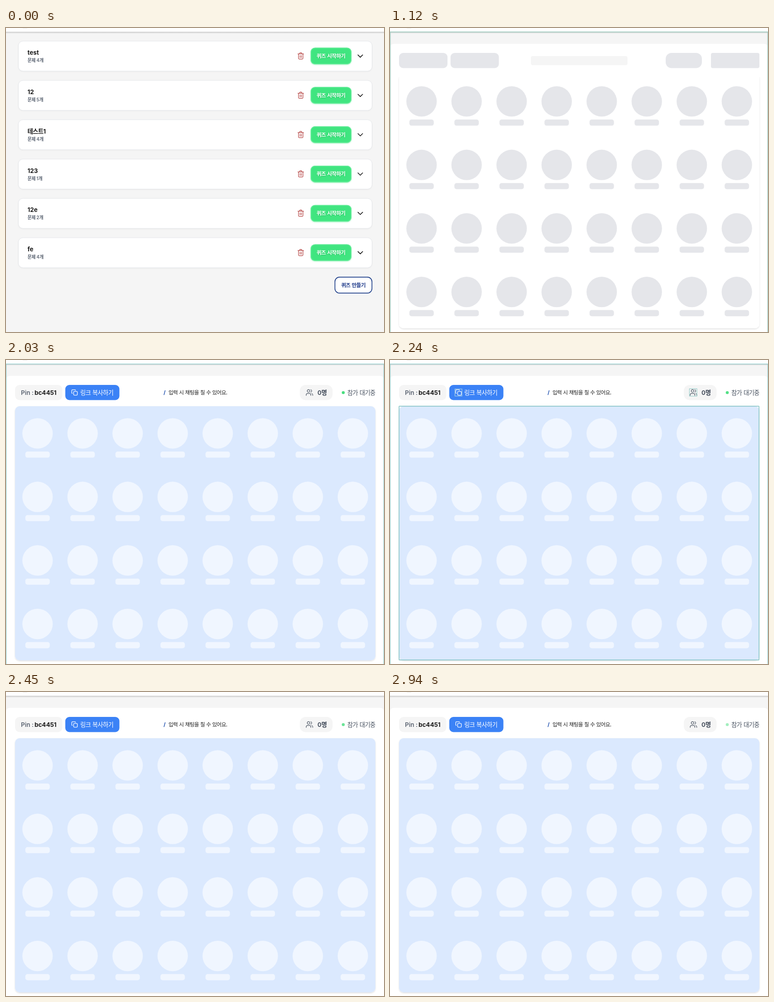
An HTML page for the animation above (3.01 s loop, 835x671 px).

```html
<!DOCTYPE html>
<html lang="ko">
<head>
<meta charset="utf-8">
<title>Quiz lobby</title>
<style>
  html, body { margin: 0; width: 100%; height: 100%; overflow: hidden; background: #f5f5f5; }
  svg { display: block; width: 100vw; height: 100vh; }
  text { font-family: Inter, "Noto Sans CJK KR", "Noto Sans CJK", sans-serif; white-space: pre; }
  .ko { letter-spacing: -.055em; }
  .line { fill: none; stroke-linecap: round; stroke-linejoin: round; }
</style>
</head>
<body>
<svg id="stage" viewBox="0 0 835 671" xmlns="http://www.w3.org/2000/svg"></svg>
<script>
const LOOP = 3010, STEP = 70;
const stage = document.getElementById('stage');

const rect = (x, y, w, h, r, fill, extra = '') =>
  `<rect x="${x}" y="${y}" width="${w}" height="${h}" rx="${r}" fill="${fill}" ${extra}/>`;

const label = (x, y, size, weight, fill, str, extra = '') =>
  `<text x="${x}" y="${y}" font-size="${size}" font-weight="${weight}" fill="${fill}" ${extra}>` +
  str.replace(/[가-힣]+/g, '<tspan class="ko">$&</tspan>') + '</text>';

const line = (d, color, width, extra = '') =>
  `<path class="line" d="${d}" stroke="${color}" stroke-width="${width}" ${extra}/>`;

const group = (id, body) => `<g id="${id}">${body}</g>`;

// Quiz list
const TRASH = 'M644.8 57.2H657.4M648.8 57V55.6Q648.8 54.5 650 54.5H652.2Q653.4 54.5 653.4 55.6V57' +
  'M646.2 57.4V66.8Q646.2 68.6 648 68.6H654.2Q656 68.6 656 66.8V57.4M649.6 60.6V65.4M652.6 60.6V65.4';

function card([name, count], i) {
  return `<g transform="translate(0 ${(i * 86.8).toFixed(1)})">` +
    rect(27.5, 29, 781, 66, 10, '#fff', 'stroke="#e5e7eb" stroke-width=".9" filter="url(#soft)"') +
    label(47.5, 59.2, 13.4, 700, '#1b1b1b', name) +
    label(47.5, 75.2, 10, 600, '#5b6472', `문제 ${count}개`) +
    line(TRASH, '#b3403f', 1.25) +
    rect(673, 43.5, 90, 36.5, 9.5, '#40e580', 'filter="url(#glow)"') +
    rect(674, 44.5, 88, 34.5, 8.5, 'none', 'stroke="#5deb94" stroke-width="1.6"') +
    label(686, 66, 11.7, 600, '#f4fff8', '퀴즈 시작하기', 'filter="url(#textShade)"') +
    line('M777.4 59.4L782.6 64.6L787.8 59.4', '#111', 1.5) + '</g>';
}

const quizzes = [['test', 4], ['12', 5], ['테스트1', 4], ['123', 1], ['12e', 2], ['fe', 4]];
const list = quizzes.map(card).join('') +
  rect(726.6, 549.9, 81.8, 35.2, 10, '#fff', 'stroke="#1e3f8a" stroke-width="1.7"') +
  label(740.5, 571.6, 11.7, 600, '#1e3a8a', '퀴즈 만들기');

// Waiting room
function seats() {
  let out = '';
  for (let row = 0; row < 4; row++)
    for (let col = 0; col < 8; col++) {
      const x = 69.7 + col * 99.5, y = 162 + row * 140.2;
      out += `<circle cx="${x.toFixed(1)}" cy="${y.toFixed(1)}" r="33.6"/>` +
        `<rect x="${(x - 27).toFixed(1)}" y="${(y + 40).toFixed(1)}" width="54" height="13.6" rx="5"/>`;
    }
  return out;
}

const page = '<path d="M0 671V44Q0 35 9 35H826Q835 35 835 44V671Z" fill="#fff"/>';

const bones = group('bars',
    rect(20, 55, 107, 33.5, 9) + rect(133.7, 55, 106.8, 33.5, 9) +
    rect(609, 55, 80, 33.5, 13) + rect(709, 55, 107, 33.5, 4)).replace(/fill="undefined"/g, '') +
  rect(311.3, 62, 213.3, 20, 4, '#f5f5f5', 'id="hint"');

const COPY = 'M151 69.3H156Q157.6 69.3 157.6 70.9V76Q157.6 77.6 156 77.6H151Q149.4 77.6 149.4 76V70.9Q149.4 69.3 151 69.3Z' +
  'M146.6 73.9Q145.3 73.9 145.3 72.5V67.2Q145.3 65.7 146.8 65.7H152.2Q153.6 65.7 153.6 67';
const USERS = 'M663.2 78.3V76.8Q663.2 73.9 666.1 73.9H670.5Q673.4 73.9 673.4 76.8V78.3' +
  'M671.2 68.3A2.9 2.9 0 1 1 665.4 68.3A2.9 2.9 0 1 1 671.2 68.3' +
  'M677.6 78.3V76.8Q677.6 74.6 675.4 74M673.2 65.5A2.9 2.9 0 0 1 673.2 71.1';

const tools =
  rect(20, 55, 104.5, 33.5, 10, '#f5f5f5') +
  label(33, 76.7, 13.4, 600, '#5b6472', 'Pin :') +
  label(63, 76.7, 13.4, 700, '#1b1b1b', 'bc4451') +
  rect(131, 55, 119.5, 33.5, 9, '#3b82f6') +
  line(COPY, '#fff', 1.3) +
  label(164, 76.7, 13.4, 500, '#fff', '링크 복사하기') +
  label(348, 76, 11.7, 700, '#1e4fae', '/') +
  label(359, 76, 11.7, 500, '#1b1b1b', '입력 시 채팅을 칠 수 있어요.') +
  rect(649, 55, 72.5, 33.5, 13, '#f5f5f5') +
  line(USERS, '#4b5563', 1.25) +
  label(688, 76.7, 13.4, 600, '#374151', '0명') +
  '<circle id="dot" cx="745" cy="72" r="3.3" fill="#4ade80"/>' +
  label(754, 76.7, 13.4, 400, '#4b5563', '참가 대기중');

const room = page +
  rect(20, 102, 796, 561, 10, '#fff', 'id="board" filter="url(#drop)"') +
  rect(16, 98, 804, 10, 0, '#fff', 'id="cover"') +
  group('seats', seats()) + group('bones', bones) + group('tools', tools);

// Repaint highlights
const frame = '<path id="frame" fill="none" d="M.5 671V8.8H834.5V671"/>';
const marks =
  rect(20, 101.8, 795.2, 560.4, 1, 'none', 'stroke="#8cc8ca" stroke-width="1.7"') +
  rect(143.4, 64, 15.6, 15.6, 0, 'none', 'stroke="#a9d5e4" stroke-width="1.1"') +
  rect(661.4, 63.4, 16.6, 16.4, 0, 'none', 'stroke="#93cbc8" stroke-width="1.1"');

const shadow = (id, dy, blur, color, alpha) =>
  `<filter id="${id}" x="-10%" y="-20%" width="120%" height="150%">` +
  `<feDropShadow dx="0" dy="${dy}" stdDeviation="${blur}" flood-color="${color}" flood-opacity="${alpha}"/></filter>`;

stage.innerHTML = '<defs>' +
  shadow('soft', .8, .8, '#000', .07) + shadow('glow', 1, 1.4, '#40e580', .55) +
  shadow('textShade', 1, .8, '#0a6b35', .35) + shadow('drop', 1.5, 1.5, '#000', .13) +
  '<linearGradient id="edge" x2="0" y2="1"><stop stop-color="#c6c6c6"/><stop offset="1" stop-color="#f5f5f5"/></linearGradient></defs>' +
  rect(0, 0, 835, 671, 0, '#f5f5f5') +
  rect(0, 0, 835, 8.5, 0, '#fff') + rect(0, 8.5, 835, 4, 0, 'url(#edge)') +
  rect(37, 0, 10, 1, 0, '#ececec') +
  group('list', list) + group('room', room) +
  frame + rect(26, 0, 35, 2.3, 0, '#a3d6db', 'id="tab"') + group('marks', marks);

const $ = id => document.getElementById(id);
const show = (id, on) => $(id).setAttribute('display', on ? 'inline' : 'none');
const paint = (id, color, prop = 'fill') => $(id).setAttribute(prop, color);

function render(time) {
  const t = Math.floor(time / STEP) * STEP;
  const loading = t < 2030, fresh = t < 1330;

  show('list', t < 840);
  show('room', t >= 840);
  show('bones', loading);
  show('cover', loading);
  show('tools', !loading);
  paint('board', loading ? '#fff' : '#dbe9fe');
  paint('seats', !loading ? '#f0f6ff' : fresh ? '#e5e6ea' : '#eff0f4');
  paint('bars', fresh ? '#e5e6ea' : '#ecedf1');
  paint('hint', fresh ? '#f5f5f5' : '#f0f6ff');

  show('frame', (t >= 840 && fresh) || (t >= 2030 && t < 2380));
  paint('frame', fresh ? '#a9cfc5' : '#9dd3d3', 'stroke');
  paint('frame', fresh ? 1.9 : 1.5, 'stroke-width');
  show('tab', t >= 840 && t < 1120);
  show('marks', t >= 2100 && t < 2380);

  const pulse = t < 2240 ? 0 : (1 - Math.cos((t - 2030) / 1000 * Math.PI)) / 2;
  paint('dot', 1 - pulse / 2, 'opacity');
}

const start = performance.now();
function tick() {
  render((performance.now() - start) % LOOP);
  requestAnimationFrame(tick);
}
tick();
</script>
</body>
</html>
```
